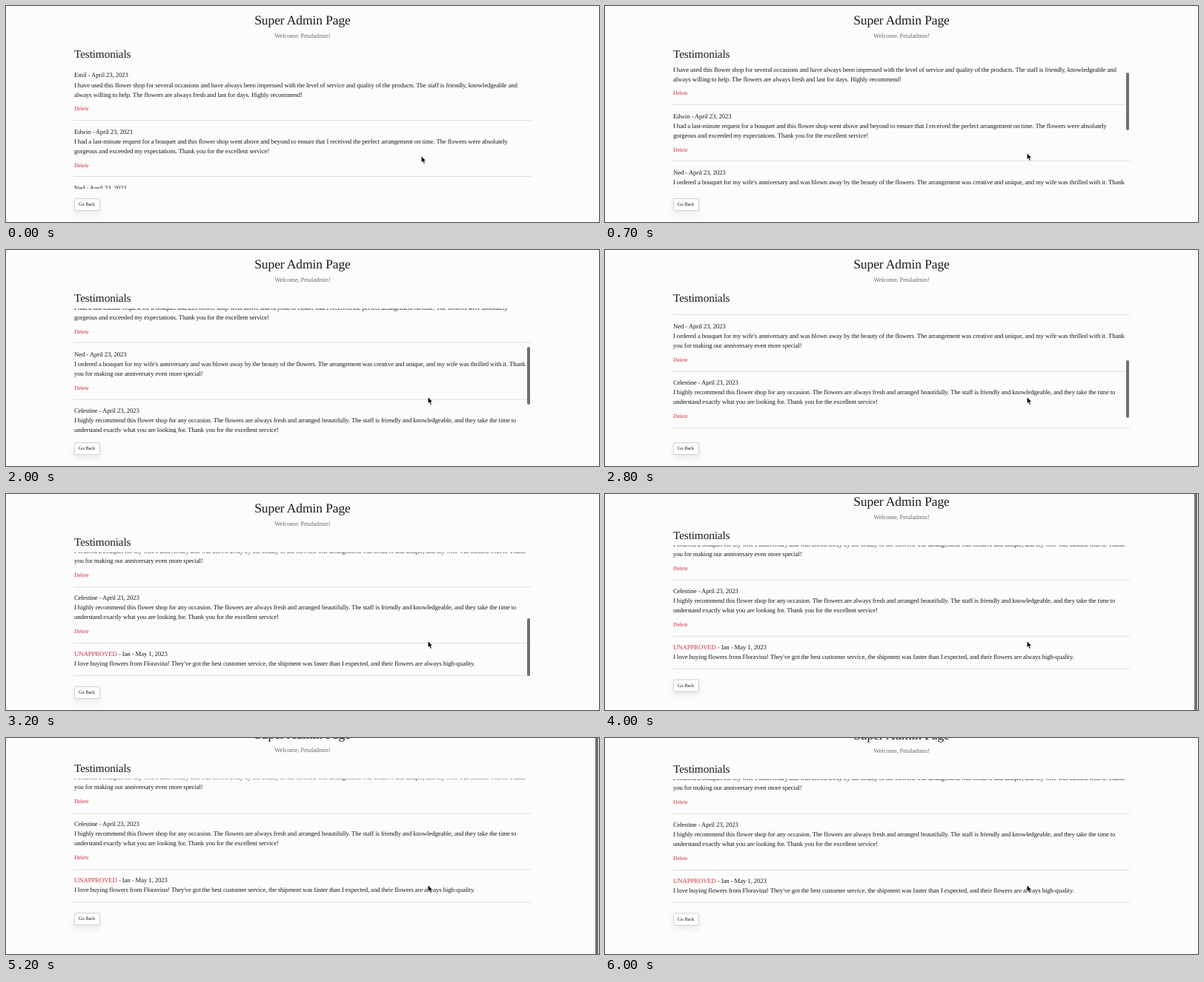
An HTML page that plays this animation: 800x292 px, repeating every 6.1 s.

```html
<!DOCTYPE html>
<html lang="en">
<head>
<meta charset="utf-8">
<title>Super Admin Page</title>
<style>
  html, body { margin: 0; width: 100%; height: 100%; overflow: hidden; background: #fcfcfc; }
  body {
    position: relative; color: #1c1c1c;
    font: 8.8px/13.3px "Liberation Serif", "Times New Roman", serif;
    letter-spacing: -.0148em; white-space: nowrap; text-rendering: geometricPrecision;
  }
  #page, #page > *, .bar, #cursor { position: absolute; }
  #page { left: 0; top: 0; width: 800px; height: 292px; }
  h1, h2, p { margin: 0; font-weight: 400; }
  h1 { top: 9px; width: 800px; text-align: center; font-size: 17.56px; line-height: 20px; }
  #welcome { top: 34.3px; width: 800px; text-align: center; font-size: 8.6px; color: #6c6c6c; }
  h2 { left: 92px; top: 56px; font-size: 15.3px; line-height: 20px; }
  #list { left: 91px; top: 79px; width: 617px; height: 168px; overflow: hidden; }
  .item { padding: 8.35px 0 8.55px 1px; border-bottom: 1px solid #dedede; }
  .red { color: #cf3341; }
  .delete { margin-top: 5.1px; font-size: 7.8px; }
  #back {
    left: 91.5px; top: 259.5px; width: 35px; height: 17px; box-sizing: border-box;
    border: 1px solid #cfcfcf; border-radius: 2px; background: #fff;
    box-shadow: 0 4px 8px #00000014; text-align: center; font-size: 6.6px; line-height: 15px;
  }
  .bar { background: #707070; }
  #listBar { left: 703px; width: 4px; height: 77.5px; border-radius: 2px; }
  #pageBar { left: 795px; top: 0; width: 4px; height: 292px; }
  #cursor { left: 0; top: 0; }
</style>
</head>
<body>
<div id="page">
  <h1>Super Admin Page</h1>
  <p id="welcome">Welcome, Petaladmin!</p>
  <h2>Testimonials</h2>
  <div id="list"><div id="items"></div></div>
  <div id="back">Go Back</div>
</div>
<div class="bar" id="listBar"></div>
<div class="bar" id="pageBar"></div>
<svg id="cursor" width="10" height="14">
  <path d="M.8 .8V9.6L2.8 7.8 4.2 11.2 5.8 10.5 4.4 7.2H7Z" stroke="#fff" stroke-width=".6"/>
</svg>
<script>
const el = id => document.getElementById(id);
const APRIL = "April 23, 2023";
const reviews = [
  ["Emil", APRIL,
    "I have used this flower shop for several occasions and have always been impressed with the level of service and quality of the products. The staff is friendly, knowledgeable and",
    "always willing to help. The flowers are always fresh and last for days. Highly recommend!"],
  ["Edwin", APRIL,
    "I had a last-minute request for a bouquet and this flower shop went above and beyond to ensure that I received the perfect arrangement on time. The flowers were absolutely",
    "gorgeous and exceeded my expectations. Thank you for the excellent service!"],
  ["Ned", APRIL,
    "I ordered a bouquet for my wife's anniversary and was blown away by the beauty of the flowers. The arrangement was creative and unique, and my wife was thrilled with it. Thank",
    "you for making our anniversary even more special!"],
  ["Celestine", APRIL,
    "I highly recommend this flower shop for any occasion. The flowers are always fresh and arranged beautifully. The staff is friendly and knowledgeable, and they take the time to",
    "understand exactly what you are looking for. Thank you for the excellent service!"],
  ["Ian", "May 1, 2023",
    "I love buying flowers from Floravina! They've got the best customer service, the shipment was faster than I expected, and their flowers are always high-quality."]
];

el("items").innerHTML = reviews.map(([name, date, ...lines]) => {
  const approved = date === APRIL;
  return `<div class="item">
    <p>${approved ? "" : '<span class="red">UNAPPROVED</span> - '}${name} - ${date}</p>
    ${lines.map(line => `<p>${line}</p>`).join("")}
    ${approved ? '<p class="red delete">Delete</p>' : ""}</div>`;
}).join("");

const LOOP = 6100, TICK = 100;

// Share of a move done, where the first of its steps shows at `start`.
function progress(t, start, steps) {
  if (t < start) return 0;
  const p = Math.min(1, (t - start + TICK) / (steps * TICK));
  return p * p * (3 - 2 * p);
}

function draw(now) {
  const t = Math.floor(now % LOOP / TICK) * TICK;

  const scroll = 54 * progress(t, 500, 7) + 64 * progress(t, 1600, 7) + 63.8 * progress(t, 2600, 7);
  el("items").style.transform = `translateY(${-scroll}px)`;
  el("listBar").style.top = 80 + .485 * scroll + "px";
  el("listBar").style.opacity = +(t >= 500 && t < 3800);

  const pageScroll = 24 * progress(t, 3800, 7) - .3 * progress(t, 5000, 4) - .3 * progress(t, 5700, 4);
  el("page").style.transform = `translateY(${-pageScroll}px)`;
  el("pageBar").style.opacity = t < 3800 ? 0 : 1 - progress(t, 5700, 4);

  const move = progress(t, 100, 2);
  el("cursor").style.transform = `translate(${559.5 + 9 * move}px, ${202 - 4 * move}px)`;
}

function frame() {
  draw(performance.now());
  requestAnimationFrame(frame);
}
frame();
</script>
</body>
</html>
```
